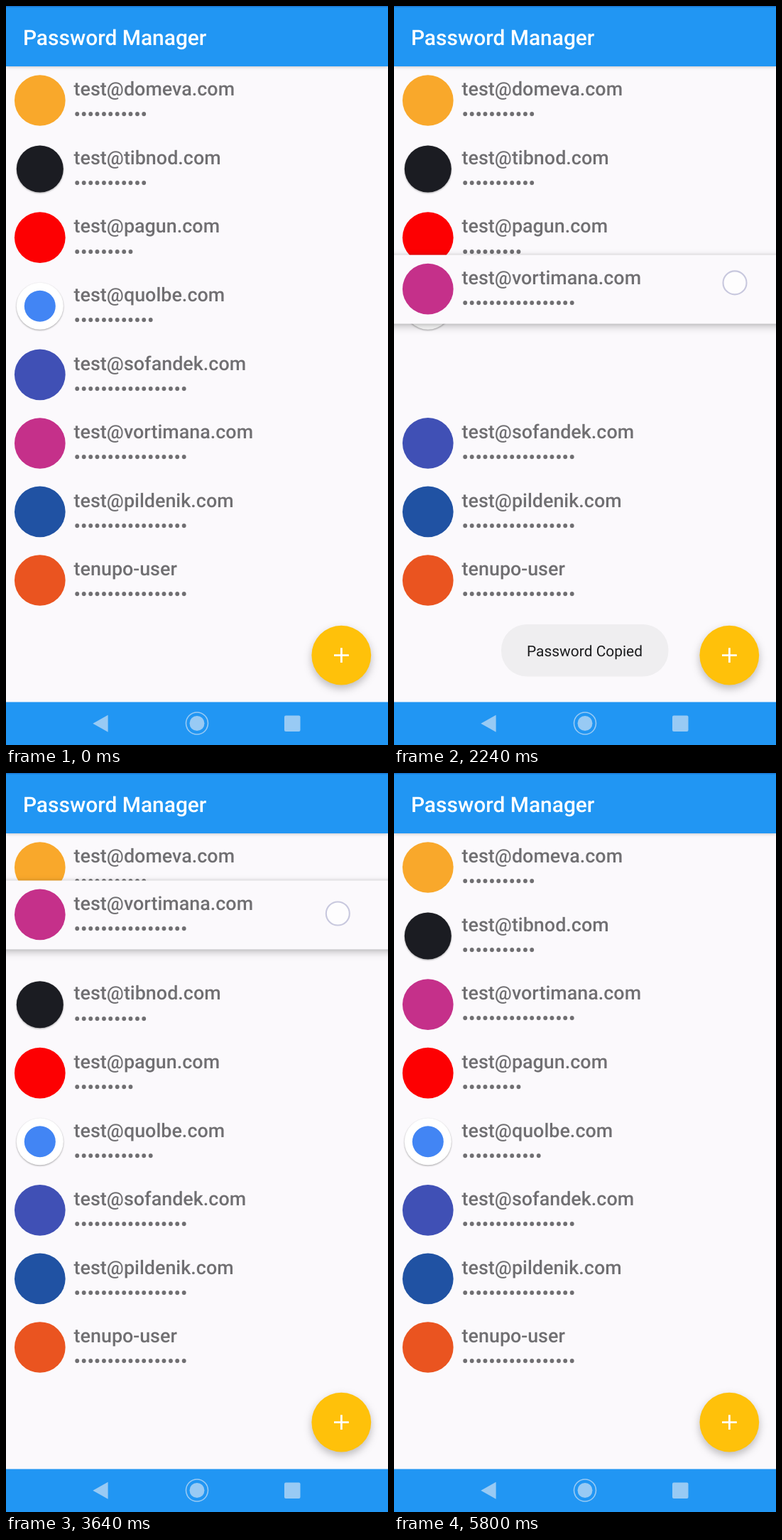
Write an HTML page that moves like this. It is 538 px wide and 1041 px high and loops after 5.84 s.

```html
<!DOCTYPE html>
<html lang="en">
<head>
<meta charset="utf-8">
<title>Password Manager</title>
<style>
  html, body { margin: 0; width: 100%; height: 100%; overflow: hidden; background: #fbf9fc; }
  svg { display: block; font-family: Roboto, Arial, sans-serif; text-rendering: geometricPrecision; }
  .bar { fill: #2196f3; }
  .header { filter: drop-shadow(0 1px 2px rgba(0,0,0,.2)); }
  .title { font-size: 29.9px; font-weight: 500; fill: #fff; }
  .entry { font-size: 26.9px; font-weight: 500; fill: #706f72; }
  .toast { font-size: 20.95px; fill: #1c1c1e; }
  .disc { filter: drop-shadow(0 1.5px 1.2px rgba(0,0,0,.35)); }
  .card { fill: #fbf9fc; filter: drop-shadow(0 4px 6px rgba(0,0,0,.2)) drop-shadow(0 0 2px rgba(0,0,0,.16)); }
  .fab { fill: #ffc10a; filter: drop-shadow(0 5px 6px rgba(0,0,0,.25)); }
  .nav { fill: #98caf4; }
</style>
</head>
<body>
<svg id="stage" width="538" height="1041" viewBox="0 0 538 1041">
  <rect width="538" height="1041" fill="#fbf9fc"/>
  <g id="list"></g>
  <g class="header">
    <rect class="bar" width="538" height="85"/>
    <rect width="538" height="1.5" fill="#1976d2"/>
  </g>
  <text class="title" x="23.9" y="55">Password Manager</text>
  <circle class="fab" cx="472.3" cy="914.6" r="41.9"/>
  <path d="M462 914.6h20.8M472.4 904.2v20.8" stroke="#fff" stroke-width="2.8"/>
  <g id="toast">
    <rect x="151" y="871" width="235.5" height="73.5" rx="36" fill="#efeef0"/>
    <text class="toast" x="187" y="916">Password Copied</text>
  </g>
  <rect class="bar" y="980.5" width="538" height="61"/>
  <g class="nav">
    <path d="M122.3 1010.7L143.6 998.7V1022.7Z"/>
    <circle cx="269" cy="1010.5" r="10.5"/>
    <circle cx="269" cy="1010.5" r="15.5" fill="none" stroke="#98caf4" stroke-width="1.6"/>
    <rect x="392" y="999.5" width="22.5" height="22.5" rx="2"/>
  </g>
  <circle id="finger" r="16.5" fill="#fff" fill-opacity=".72" stroke="#c8c8de" stroke-width="2.1"/>
</svg>
<script>
const LOOP = 5840, TOP = 85, PITCH = 96.57, MID = 48;
const DRAGGED = 5;

// name, password length, disc colour, inset disc with a shadow
const ENTRIES = [
  ['test@domeva.com', 11, '#f9a82b'],
  ['test@tibnod.com', 11, '#1b1c22', true],
  ['test@pagun.com', 9, '#fd0002'],
  ['test@quolbe.com', 12, '#ffffff', true],
  ['test@sofandek.com', 17, '#4050b5'],
  ['test@vortimana.com', 17, '#c5308a'],
  ['test@pildenik.com', 17, '#2052a3'],
  ['tenupo-user', 17, '#ea5420'],
];

// entry, start time, from slot, to slot
const SWAPS = [
  [4, 1970, 4, 5],
  [3, 2235, 3, 4],
  [2, 2500, 2, 3],
  [1, 2705, 1, 2],
  [1, 4040, 2, 1],
];

// centre of the dragged row over time
const DRAG = [
  [1700, 616], [1820, 588], [1960, 523], [2120, 462], [2240, 399], [2380, 361],
  [2500, 326], [2680, 239], [2820, 203], [3000, 189], [3200, 187], [3520, 187],
  [3720, 215], [3900, 282], [4040, 330], [4160, 334], [4400, 332], [4640, 326.1],
];
const FINGER_X = [[720, 467], [1720, 467], [2240, 480], [2680, 467], [3280, 465], [4040, 470], [4400, 470]];
const PRESS = 720, RELEASE = 4400;

const SVG = 'http://www.w3.org/2000/svg';
const byId = id => document.getElementById(id);
function add(parent, tag, attrs, text) {
  const el = document.createElementNS(SVG, tag);
  for (const k in attrs) el.setAttribute(k, attrs[k]);
  if (text) el.textContent = text;
  return parent.appendChild(el);
}

const ramp = (t, a, b) => Math.min(1, Math.max(0, (t - a) / (b - a)));
const ease = p => (1 - Math.cos(Math.PI * p)) / 2;

// smooth curve through the keys, without overshoot
function follow(keys, t) {
  const last = keys.length - 1;
  if (t <= keys[0][0]) return keys[0][1];
  if (t >= keys[last][0]) return keys[last][1];
  const slope = i => (keys[i + 1][1] - keys[i][1]) / (keys[i + 1][0] - keys[i][0]);
  const tangent = i => {
    if (i === 0 || i === last) return 0;
    const a = slope(i - 1), b = slope(i);
    return a * b > 0 ? 2 * a * b / (a + b) : 0;
  };
  let i = 0;
  while (t >= keys[i + 1][0]) i++;
  const [t0, v0] = keys[i], [t1, v1] = keys[i + 1];
  const h = t1 - t0, p = (t - t0) / h, q = 1 - p;
  return q * q * ((1 + 2 * p) * v0 + p * h * tangent(i))
       + p * p * ((1 + 2 * q) * v1 - q * h * tangent(i + 1));
}

let card, ripple;
const rows = [];
function buildRow(i) {
  const [name, length, colour, inset] = ENTRIES[i];
  const row = rows[i] = add(byId('list'), 'g');
  if (i === DRAGGED) {
    card = add(row, 'rect', { class: 'card', x: -30, width: 598, height: 97 });
    const clip = add(row, 'svg', { width: 538, height: 97, overflow: 'hidden' });
    ripple = add(clip, 'circle', { cx: 467, cy: 44, fill: '#faeecd' });
  }
  add(row, 'circle', { cx: 47.8, cy: MID, r: inset ? 33 : 35.85, fill: colour, class: inset ? 'disc' : '' });
  if (colour === '#ffffff') add(row, 'circle', { cx: 47.8, cy: MID, r: 22, fill: '#4285f4' });
  add(row, 'text', { class: 'entry', x: 95.6, y: 41.3 }, name);
  add(row, 'text', { class: 'entry', x: 95.6, y: 77.4 }, '•'.repeat(length));
}
ENTRIES.forEach((_, i) => { if (i !== DRAGGED) buildRow(i); });
buildRow(DRAGGED);

function slotOf(i, t) {
  let slot = i;
  for (const [entry, start, from, to] of SWAPS) {
    if (entry === i && t >= start) slot = from + (to - from) * ease(ramp(t, start, start + 250));
  }
  return slot;
}

function draw(t) {
  rows.forEach((row, i) => {
    const y = i === DRAGGED ? follow(DRAG, t) - MID : TOP + PITCH * slotOf(i, t);
    row.setAttribute('transform', `translate(0 ${y.toFixed(2)})`);
  });
  card.setAttribute('opacity', ramp(t, 1640, 1840) * (1 - ramp(t, 4420, 4660)));
  ripple.setAttribute('r', 480 * ease(ramp(t, PRESS + 60, PRESS + 420)));
  ripple.setAttribute('opacity', ramp(t, PRESS + 60, PRESS + 180) * (1 - ramp(t, 1720, 1900)));
  byId('toast').setAttribute('opacity', ramp(t, 1250, 1430) * (1 - ramp(t, 3240, 3480)));

  const finger = byId('finger');
  finger.setAttribute('cx', follow(FINGER_X, t));
  finger.setAttribute('cy', follow(DRAG, t + 14) - 4);
  finger.setAttribute('opacity', t >= PRESS && t < RELEASE ? 1 : 0);
}

const begin = performance.now();
function tick() {
  draw((performance.now() - begin) % LOOP);
  requestAnimationFrame(tick);
}
draw(0);
requestAnimationFrame(tick);
</script>
</body>
</html>
```
